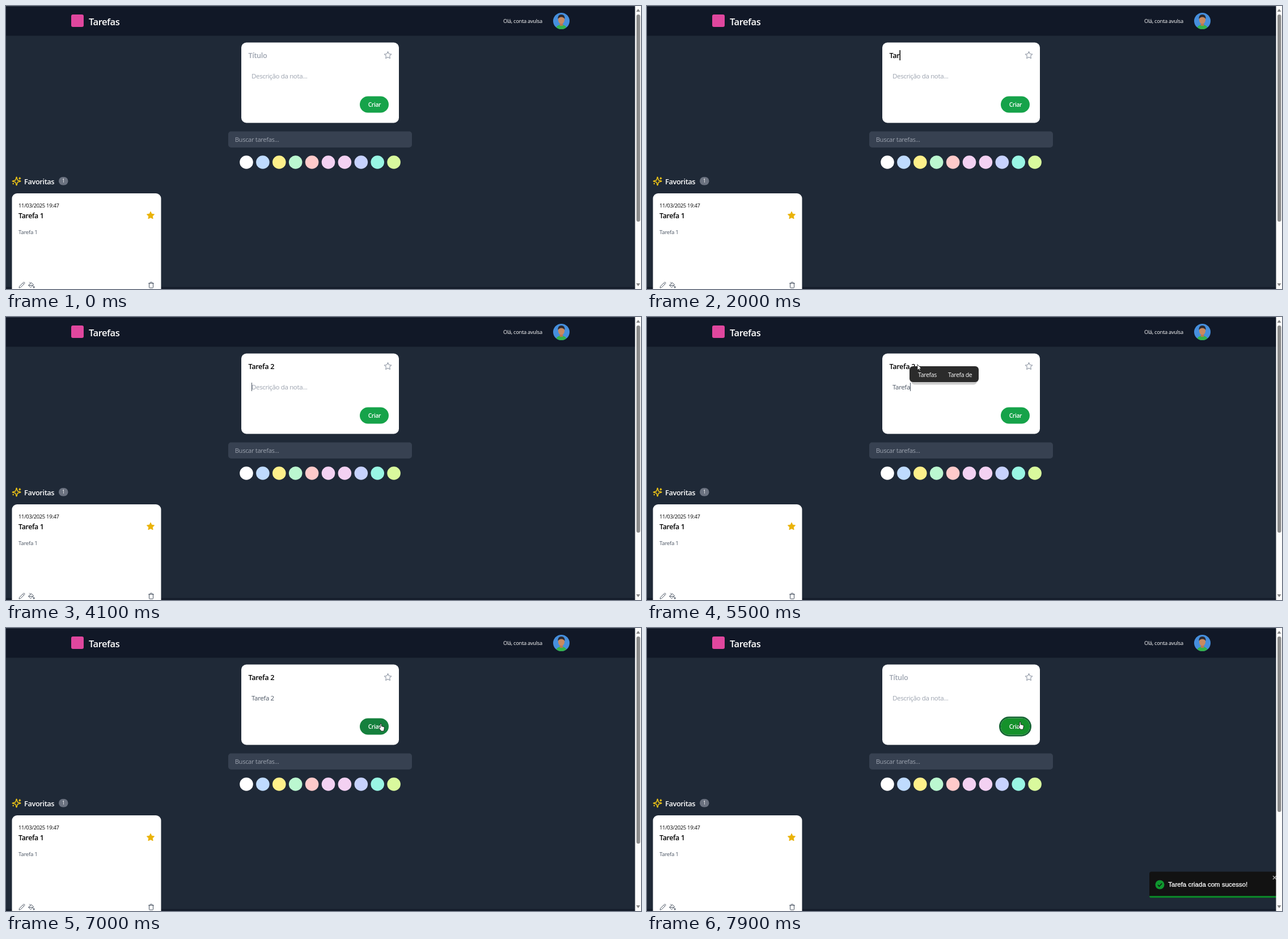
An HTML page that plays this animation: 1120 by 500 pixels, repeating every 8 s.

```html
<!DOCTYPE html>
<html lang="pt">
<head>
<meta charset="utf-8">
<title>Tarefas</title>
<style>
  html, body { margin: 0; width: 100%; height: 100%; overflow: hidden; background: #1f2937; }
  svg { display: block; }
  text { font-family: "Open Sans", "Noto Sans", sans-serif; letter-spacing: -.03em; white-space: pre; }
  .semi { font-weight: 600; }
  .icon { fill: none; stroke-width: 2; stroke-linecap: round; stroke-linejoin: round; }
  .toast { font: 11.5px "Liberation Sans", Arial, sans-serif; letter-spacing: 0; stroke: #fff; stroke-width: .3px; }
</style>
</head>
<body>
<svg width="1120" height="500" viewBox="0 0 1120 500">
  <defs>
    <path id="star" d="M12 2l3.09 6.26 6.91 1.01-5 4.87 1.18 6.88L12 17.77l-6.18 3.25L7 14.14 2 9.27l6.91-1.01z"/>
    <clipPath id="round"><circle cx="979.5" cy="26.5" r="14.5"/></clipPath>
  </defs>

  <!-- header -->
  <rect width="1110" height="52.5" fill="#111827"/>
  <rect width="1120" height="1" fill="#303846"/>
  <rect x="115" y="15" width="22" height="22" rx="3" fill="#e0479e"/>
  <text class="semi" x="146" y="33.7" font-size="16.6" fill="#fff">Tarefas</text>
  <text x="877" y="30.4" font-size="9.3" fill="#fff">Olá, conta avulsa</text>
  <g clip-path="url(#round)">
    <rect x="965" y="12" width="29" height="29" fill="#468fdd"/>
    <ellipse cx="979.5" cy="40" rx="9.5" ry="7" fill="#35b34a"/>
    <rect x="976.8" y="29" width="5.4" height="6" fill="#b97850"/>
    <ellipse cx="979.5" cy="24.5" rx="5.6" ry="7" fill="#c98a60"/>
    <path d="M973.5 23q-.5-8 6-8t6 8q-2-3.500-6-3.500t-6 3.500z" fill="#2c2a30"/>
  </g>

  <!-- new note form -->
  <rect x="415" y="64.500" width="278" height="142" rx="9" fill="#fff"/>
  <text class="semi" id="title" x="427.500" y="91.700" font-size="12.700"/>
  <text id="desc" x="433" y="127.600" font-size="11.500"/>
  <rect id="caret"/>
  <use class="icon" href="#star" transform="translate(666.1 79.4) scale(.62)" stroke="#9ca3af"/>
  <rect id="ring" x="622.500" y="158" width="54" height="32" rx="16" fill="none" stroke="#166534" stroke-width="3"/>
  <rect id="button" x="624" y="159.500" width="51" height="29" rx="14.500"/>
  <text class="semi" x="638.700" y="177.800" font-size="10.200" fill="#fff">Criar</text>

  <!-- search and colours -->
  <rect x="392" y="221.500" width="324" height="28.500" rx="5" fill="#374151"/>
  <text x="403.700" y="239.700" font-size="11.200" fill="#9ca3af">Buscar tarefas...</text>
  <g id="swatches"></g>

  <!-- favourites -->
  <path class="icon" transform="translate(9.9 300.900) scale(.72)" stroke="#facc15" d="M9.937 15.500A2 2 0 0 0 8.500 14.063l-6.135-1.582a.5.5 0 0 1 0-.962L8.500 9.936A2 2 0 0 0 9.937 8.500l1.582-6.135a.5.5 0 0 1 .963 0L14.063 8.500A2 2 0 0 0 15.500 9.937l6.135 1.581a.5.5 0 0 1 0 .964L15.500 14.063a2 2 0 0 0-1.437 1.437l-1.582 6.135a.5.5 0 0 1-.963 0zM20 3v4M22 5h-4M4 17v2M5 18H3"/>
  <text class="semi" x="32" y="314.500" font-size="12.800" fill="#fff">Favoritas</text>
  <rect x="93" y="302" width="16.500" height="14.500" rx="7.250" fill="#6b7280"/>
  <text x="101.200" y="312.300" font-size="8.500" fill="#fff" text-anchor="middle">1</text>
  <rect y="496.500" width="1110" height="4" fill="#151d2b"/>
  <rect x="10.500" y="331" width="263" height="180" rx="9" fill="#fff"/>
  <text x="22" y="355.700" font-size="9.400">11/03/2025 19:47</text>
  <text class="semi" x="22" y="374.700" font-size="12.400">Tarefa 1</text>
  <text x="22" y="402.800" font-size="9.700" fill="#4b5563">Tarefa 1</text>
  <use href="#star" transform="translate(247.100 362) scale(.66)" fill="#eab308" stroke="#eab308" stroke-width="1.500" stroke-linejoin="round"/>
  <g class="icon" stroke="#4b5563">
    <path transform="translate(22 487) scale(.5)" d="M21.174 6.812a1 1 0 0 0-3.986-3.987L3.842 16.174a2 2 0 0 0-.5.83l-1.321 4.352a.5.5 0 0 0 .623.622l4.353-1.320a2 2 0 0 0 .83-.497zM15 5l4 4"/>
    <path transform="translate(39 487) scale(.5)" d="M19 11l-8-8-8.600 8.600a2 2 0 0 0 0 2.800l5.200 5.200c.8.8 2 .8 2.800 0zM5 2l5 5M2 13h15M22 20a2 2 0 1 1-4 0c0-1.600 1.700-2.400 2-4 .3 1.600 2 2.400 2 4z"/>
    <path transform="translate(250 487) scale(.5)" d="M3 6h18M19 6v14a2 2 0 0 1-2 2H7a2 2 0 0 1-2-2V6M8 6V4a2 2 0 0 1 2-2h4a2 2 0 0 1 2 2v2"/>
  </g>

  <!-- word suggestions -->
  <g id="popup">
    <rect id="shade" x="3" y="6" height="26.500" rx="6" fill="#000" opacity=".2"/>
    <rect id="box" height="28" rx="6" fill="#2b2b2b"/>
    <text id="word1" x="15" y="19" font-size="10.500" fill="#fff"/>
    <text id="word2" y="19" font-size="10.500" fill="#fff"/>
  </g>

  <!-- toast -->
  <g id="toast">
    <rect x="886" y="430.500" width="240" height="46" rx="4" fill="#121212"/>
    <path d="M886 473.500h224v3H889q-3 0-3-3z" fill="#0b8f2b"/>
    <circle cx="904.500" cy="453.500" r="8" fill="#0f982f"/>
    <path d="M901 453.800l2.500 2.600 4.700-5.200" fill="none" stroke="#121212" stroke-width="1.500"/>
    <text class="toast" x="919.300" y="457.300" fill="#fff">Tarefa criada com sucesso!</text>
    <path d="M1104 438l6 6m0-6l-6 6" stroke="#b5b5b5" stroke-width="1.300"/>
  </g>

  <!-- scrollbar -->
  <rect x="1109.500" width="10.500" height="500" fill="#fcfcfc"/>
  <path d="M1111.500 10l3.500-5 3.500 5zM1111.500 490l3.500 5 3.500-5z" fill="#858585"/>
  <rect id="thumb" x="1112" y="15" width="6.500" rx="3.250" fill="#8b8b8b"/>

  <path id="arrow" d="M.4.4v10.200l2.400-2.200 1.600 3.400 1.600-.700-1.600-3.400h3.300z" fill="#fff" stroke="#000" stroke-width=".8"/>
  <path id="hand" d="M2.500 8V1.500a1.100 1.100 0 0 1 2.200 0V5l4 .9q1.300.4 1.200 1.800l-.7 4.300-.8 1.700H4.200L.6 8.900q-.3-1.400 1-1.200z" fill="#fff" stroke="#000" stroke-width=".8"/>
</svg>
<script>
const LOOP = 8000;
const $ = id => document.getElementById(id);
const set = (id, attrs) => { for (const k in attrs) $(id).setAttribute(k, attrs[k]); };
const show = (id, on) => set(id, { visibility: on ? 'visible' : 'hidden' });
const place = (id, x, y) => set(id, { transform: `translate(${x} ${y})` });
const within = (t, a, b) => t >= a && t < b;

$('swatches').innerHTML = ['#fff', '#bfdbfe', '#fef08a', '#bbf7d0', '#fecaca', '#f3d1f2', '#f3d1f2', '#c7d2fe', '#99f6e4', '#d9f99d']
  .map((c, i) => `<circle cx="${424 + i * 28.9}" cy="276" r="11.8" fill="${c}"/>`).join('');

const ENTRY = 'Tarefa 2', CLEARED = 7700;
const titleKeys = [1800, 1900, 2000, 2200, 2300, 2400, 2500, 2600];
const descKeys = [4900, 5000, 5100, 5200, 5300, 5500, 5600, 6000];

// start, end, from x/y, to x/y
const moves = [
  [400, 800, 329, 50, 440, 77],
  [3100, 3400, 464, 99, 446, 104],
  [5500, 6300, 476.5, 83.5, 476.5, 83.5],
  [6600, 7000, 482, 98, 640, 154]
];

// start, end, x, y, width, words
const popups = [
  [2300, 2700, 457, 53, 110, 'Tarefa', 'Tarefas'],
  [5500, 5700, 463, 87, 122, 'Tarefas', 'Tarefa de'],
  [5700, 6100, 463, 87, 108, 'Tarefa', 'Tarefas']
];

function field(id, keys, t, hint, ink, pale) {
  const typed = t < CLEARED ? ENTRY.slice(0, keys.filter(k => k <= t).length) : '';
  $(id).textContent = typed || hint;
  set(id, { fill: typed ? ink : pale });
  return typed ? $(id).getComputedTextLength() : 0;
}

function draw(t) {
  const titleEnd = field('title', titleKeys, t, 'Título', '#000', '#9ca3af');
  const descEnd = field('desc', descKeys, t, 'Descrição da nota...', '#4b5563', '#9ca3af');

  const inTitle = within(t, 1100, 1600) || within(t, 1800, 3100);
  const inDesc = within(t, 4100, 4600) || within(t, 4900, 6600);
  show('caret', inTitle || inDesc);
  set('caret', inTitle
    ? { x: 427.6 + titleEnd, y: 78, width: 1.5, height: 18, fill: '#000' }
    : { x: 433 + descEnd, y: 116, width: 1, height: 15, fill: '#4b5563' });

  const popup = popups.find(p => within(t, p[0], p[1]));
  show('popup', popup);
  if (popup) {
    const [, , x, y, width, first, second] = popup;
    place('popup', x, y);
    set('box', { width });
    set('shade', { width: width - 6 });
    $('word1').textContent = first;
    $('word2').textContent = second;
    set('word2', { x: 35 + $('word1').getComputedTextLength() });
  }

  const move = moves.find(m => within(t, m[0], m[1]));
  show('arrow', move);
  if (move) {
    const [a, b, x0, y0, x1, y1] = move, p = (t - a) / (b - a - 100);
    place('arrow', x0 + (x1 - x0) * p, y0 + (y1 - y0) * p);
  }
  show('hand', t >= 7000);
  place('hand', ...(t < 7100 ? [657.5, 168.5] : [654.5, 165.5]));

  show('ring', t >= 7300);
  set('button', { fill: t < 7000 ? '#16a34a' : t < 7300 ? '#15803d' : '#15912b' });
  show('toast', t >= 7900);
  set('thumb', { height: t < 7900 ? 366 : 310 });
}

const start = performance.now();
function tick() {
  const t = (performance.now() - start) % LOOP;
  draw(Math.floor(t / 100) * 100);
  requestAnimationFrame(tick);
}
tick();
</script>
</body>
</html>
```
